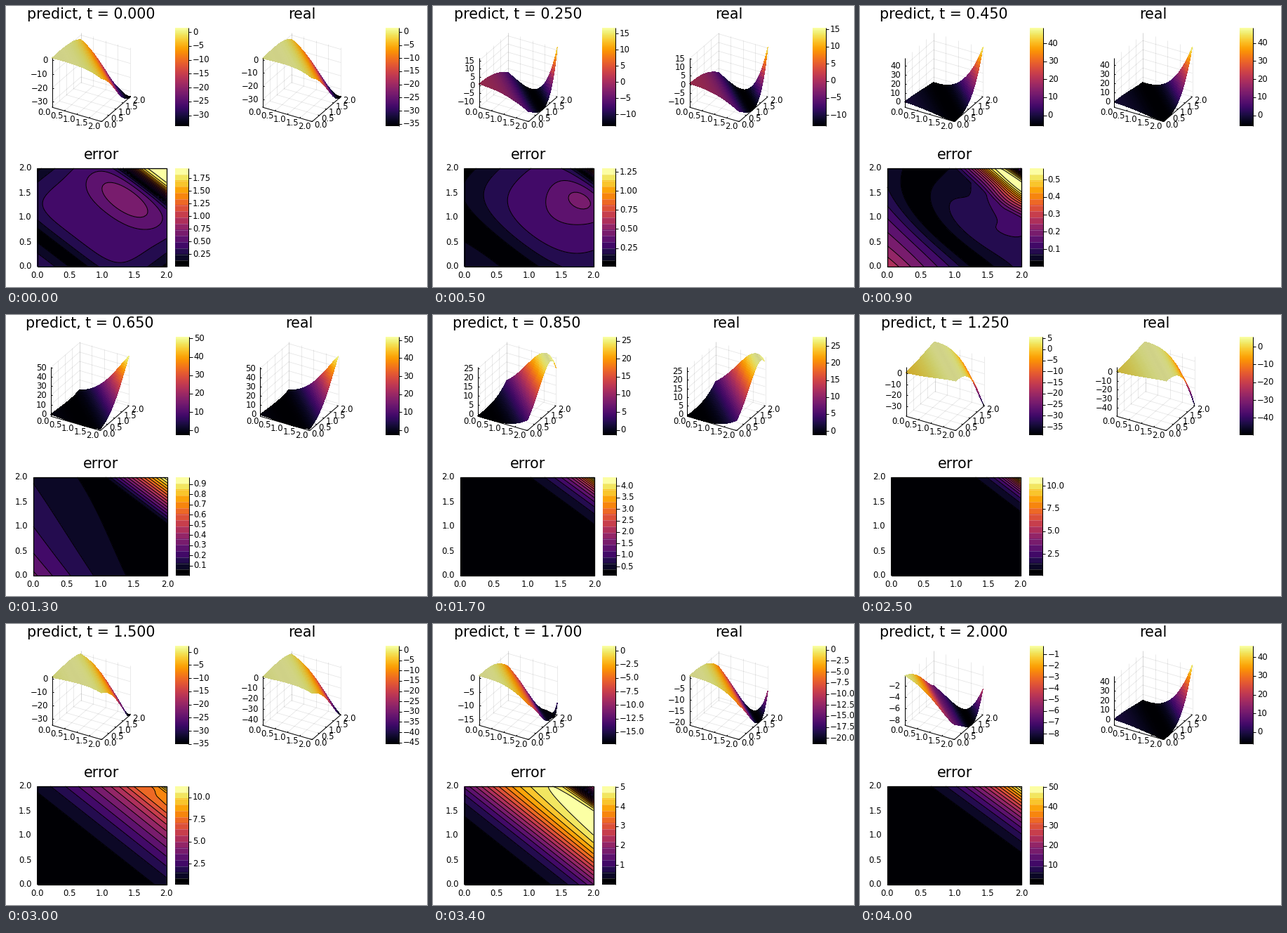
Write a matplotlib script that moves like this. It is 600x400 px and loops after 4.1 s.

```python
import math

import numpy as np
import matplotlib.pyplot as plt
from matplotlib.animation import FuncAnimation
from matplotlib.collections import LineCollection, PolyCollection

STEPS, INTERVAL = 41, 100
PX = 0.72                      # points per pixel at 100 dpi
TICK, TITLE = 11.6 * PX, 20.6 * PX
CMAP = plt.get_cmap("inferno")
BANDS = CMAP(np.linspace(0, 1, 16))
GAP_RIGHT = 71.5               # room for a colour bar
U = 81.5                       # edge length of the 3D box
AXIS_TICKS = np.linspace(0, 2, 5)

N = 41
grid = np.linspace(0, 2, N)
X, Y = np.meshgrid(grid, grid)
S, D = X + Y, X - Y


def rise(center, width):
    return 1 / (1 + np.exp((center - S) / width))


def corner(width):
    """Exponential growth towards x = y = 2."""
    return np.exp((S - 4) / width)


def ramp(start, power):
    return (np.clip(S - start, 0, None) / (4 - start)) ** power


def bump(s, d, ws, wd):
    return np.exp(-((S - s) / ws) ** 2 - ((D - d) / wd) ** 2)


# Signed prediction error at a few times, blended in between
ERRORS = {
    0: (1 - (D / 2.1) ** 4) * (0.35 - 0.8 * rise(0.7, 0.22) - 0.28 * bump(2.72, 0, 0.4, 0.9))
       + 2.4 * rise(3.45, 0.09),
    0.25: (1 - ((D - 0.4) / 2.6) ** 2) * (0.2 - 0.55 * rise(1.1, 0.4))
          - 0.1 * bump(3.15, 0.45, 0.35, 0.5) + 1.64 * corner(0.15),
    0.65: 0.32 * np.exp(-S / 1.25) - 0.05 * D * (1 - S / 4) - 0.98 * ramp(2.95, 1.1),
    1: -0.175 - 0.33 * np.exp(-S / 0.8) - 3.5 * corner(0.38),
    1.25: 0.1 + 10.85 * corner(0.25),
    1.7: 5.3 * rise(2.35, 0.36) + 0.4 * D * (S / 4) ** 3 - 8 * rise(3.75, 0.09),
    2: -0.1 - 50.4 * ramp(1.9, 2.7),
}
TIMES = np.array(list(ERRORS), float)
KEYS = np.array(list(ERRORS.values()))
SLOPES = np.gradient(KEYS, TIMES, axis=0)


def error_at(t):
    i = min(np.searchsorted(TIMES, t, side="right") - 1, len(TIMES) - 2)
    h = TIMES[i + 1] - TIMES[i]
    u = (t - TIMES[i]) / h
    ease = u * u * (3 - 2 * u)
    return ((1 - ease) * KEYS[i] + ease * KEYS[i + 1]
            + u * (1 - u) * h * ((1 - u) * SLOPES[i] - u * SLOPES[i + 1]))


def ticks(lo, hi, choices, most):
    """Tick values and labels for the finest nice step that is not too dense."""
    mag = 10 ** math.floor(math.log10(hi - lo))
    step = next((c * mag for c in choices if hi - lo <= most * c * mag), choices[-1] * mag)
    digits = next((k for k in range(3) if math.isclose(step * 10 ** k, round(step * 10 ** k))), 3)
    ks = range(math.ceil(lo / step), math.floor(hi / step) + 1)
    labels = [f"{k * step:.{digits}f}".replace("-", "\u2212") for k in ks]
    if ks and ks[-1] == 0:
        labels[-1] = "0"
    return [k * step for k in ks], labels


def z_ticks(lo, hi):
    return ticks(lo, hi, (0.2, 0.5, 1, 2), 6.5)


def label_width(text):
    return sum({"\u2212": 9, ".": 3.5}.get(c, 7) for c in text)


def left_pad(labels):
    return 21.5 + max(map(label_width, labels), default=0)


fig = plt.figure(figsize=(6, 4), dpi=100, facecolor="white")
ax = fig.add_axes([0, 0, 1, 1])


def text(x, y, s, ha="center", size=TICK):
    ax.text(x, y, s, ha=ha, va="center", size=size, family="DejaVu Sans", color="black")


def lines(segments, width=1, color="black", z=3):
    ax.add_collection(LineCollection(segments, linewidths=width * PX, colors=[color], zorder=z))


def color_bar(x, top, lo, hi, colors):
    bottom = top + 140
    ax.imshow(colors[::-1, None, :], extent=(x, x + 18.5, bottom, top),
              aspect="auto", interpolation="nearest", zorder=2)
    if len(colors) == len(BANDS):
        seams = [top + 140 * k / 16 for k in range(1, 16)]
        lines([[(x, y), (x + 18.5, y)] for y in seams], 0.5, (1, 1, 1, 0.4))
    edge = x + 19
    segs = [[(edge, top), (edge, bottom)]]
    for v, s in zip(*ticks(lo, hi, (0.25, 0.5, 1), 10)):
        y = bottom - 140 * (v - lo) / (hi - lo)
        segs.append([(edge, y), (edge + 4.5, y)])
        text(edge + 6.5, y, s, "left")
    lines(segs)


def surface(left, width, title, data, lo, hi):
    mid = left + width / 2 - 15
    x0, y0 = mid - 55.7, 144.2

    def project(x, y, h):
        px = x0 + U * (0.866 * x / 2 + 0.5 * y / 2)
        py = y0 + U * (0.25 * x / 2 - 0.433 * y / 2 - 0.866 * h)
        return px, py

    def seg(a, b):
        return [project(*a), project(*b)]

    vals, labels = z_ticks(lo, hi)
    heights = [(v - lo) / (hi - lo) for v in vals]
    walls = [seg((0, 0, h), (0, 2, h)) for h in heights]
    walls += [seg((0, 2, h), (2, 2, h)) for h in heights]
    for v in AXIS_TICKS:
        walls += [seg((v, 0, 0), (v, 2, 0)), seg((v, 2, 0), (v, 2, 1)),
                  seg((0, v, 0), (2, v, 0)), seg((0, v, 0), (0, v, 1))]
    lines(walls, 0.8, (0, 0, 0, 0.1), 1)

    # Quads from back to front, slightly darker where flat
    h = (data - lo) / (hi - lo)
    pts = np.stack(project(X, Y, h), axis=-1)[::-1]
    quads = np.stack([pts[:-1, :-1], pts[:-1, 1:], pts[1:, 1:], pts[1:, :-1]], axis=2)
    hr = h[::-1]
    mean = (hr[:-1, :-1] + hr[:-1, 1:] + hr[1:, 1:] + hr[1:, :-1]) / 4
    steep = np.abs(np.diff(hr, axis=1)[:-1]) / (grid[1] - grid[0])
    rgba = CMAP(mean)
    rgba[..., :3] *= (0.82 + 0.16 * np.minimum(1, 2 * steep))[..., None]
    ax.add_collection(PolyCollection(quads.reshape(-1, 4, 2), facecolors=rgba.reshape(-1, 4),
                                     edgecolors="none", antialiased=False, zorder=2))

    axes = [seg((0, 0, 0), (0, 0, 1)), seg((0, 0, 0), (2, 0, 0)), seg((2, 0, 0), (2, 2, 0))]
    for level, s in zip(heights, labels):
        x, y = project(0, 0, level)
        axes.append([(x, y), (x + 2, y)])
        text(x - 6, y + 0.5, s, "right")
    for v in AXIS_TICKS:
        x, y = project(v, 0, 0)
        axes.append([(x, y), (x + 1, y - 1.5)])
        text(x - 11, y + 7, f"{v:.1f}")
        x, y = project(2, v, 0)
        axes.append([(x, y), (x - 2, y - 0.6)])
        text(x + 12, y + 5, f"{v:.1f}")
    lines(axes)
    text(mid, 12, title, size=TITLE)
    color_bar(left + width + 12, 31, lo, hi, CMAP(np.linspace(0, 1, 256)))


def error_map(left, width, err):
    right, top, bottom = left + width, 231, 371
    px, py = left + X * width / 2, bottom - Y * 70
    lo, hi = err.min(), err.max()
    levels = np.linspace(lo, hi, 17)
    ax.contourf(px, py, err, levels=levels, colors=BANDS, zorder=2)
    ax.contour(px, py, err, levels=levels[1:-1], colors="black", linewidths=PX, zorder=3)
    lines([[(left, top), (right, top), (right, bottom), (left, bottom), (left, top)]], 1.3)
    for v in AXIS_TICKS:
        text(left + v * width / 2, 383.5, f"{v:.1f}")
        text(left - 8, bottom - 70 * v, f"{v:.1f}", "right")
    text(left + width / 2, 212, "error", size=TITLE)
    color_bar(right + 12, top, lo, hi, BANDS)


def draw(step):
    ax.clear()
    ax.axis("off")
    t = step * 0.05
    real = np.exp(S) * np.cos(S + 4 * t)
    diff = error_at(t)
    pred = real + diff

    span_p, span_r = (pred.min(), pred.max()), (real.min(), real.max())
    pad_p = left_pad(z_ticks(*span_p)[1] + ["2.0"])
    pad_r = left_pad(z_ticks(*span_r)[1])
    width = (600 - 2 * GAP_RIGHT - pad_p - pad_r) / 2
    left_r = pad_p + width + GAP_RIGHT + pad_r

    surface(pad_p, width, f"predict, t = {t:.3f}", pred, *span_p)
    surface(left_r, width, "real", real, *span_r)
    error_map(pad_p, width, np.abs(diff))
    ax.set_xlim(0, 600)
    ax.set_ylim(400, 0)
    return []


anim = FuncAnimation(fig, draw, frames=STEPS, init_func=lambda: [], interval=INTERVAL,
                     repeat=True, repeat_delay=0, blit=False)
plt.show()
```
